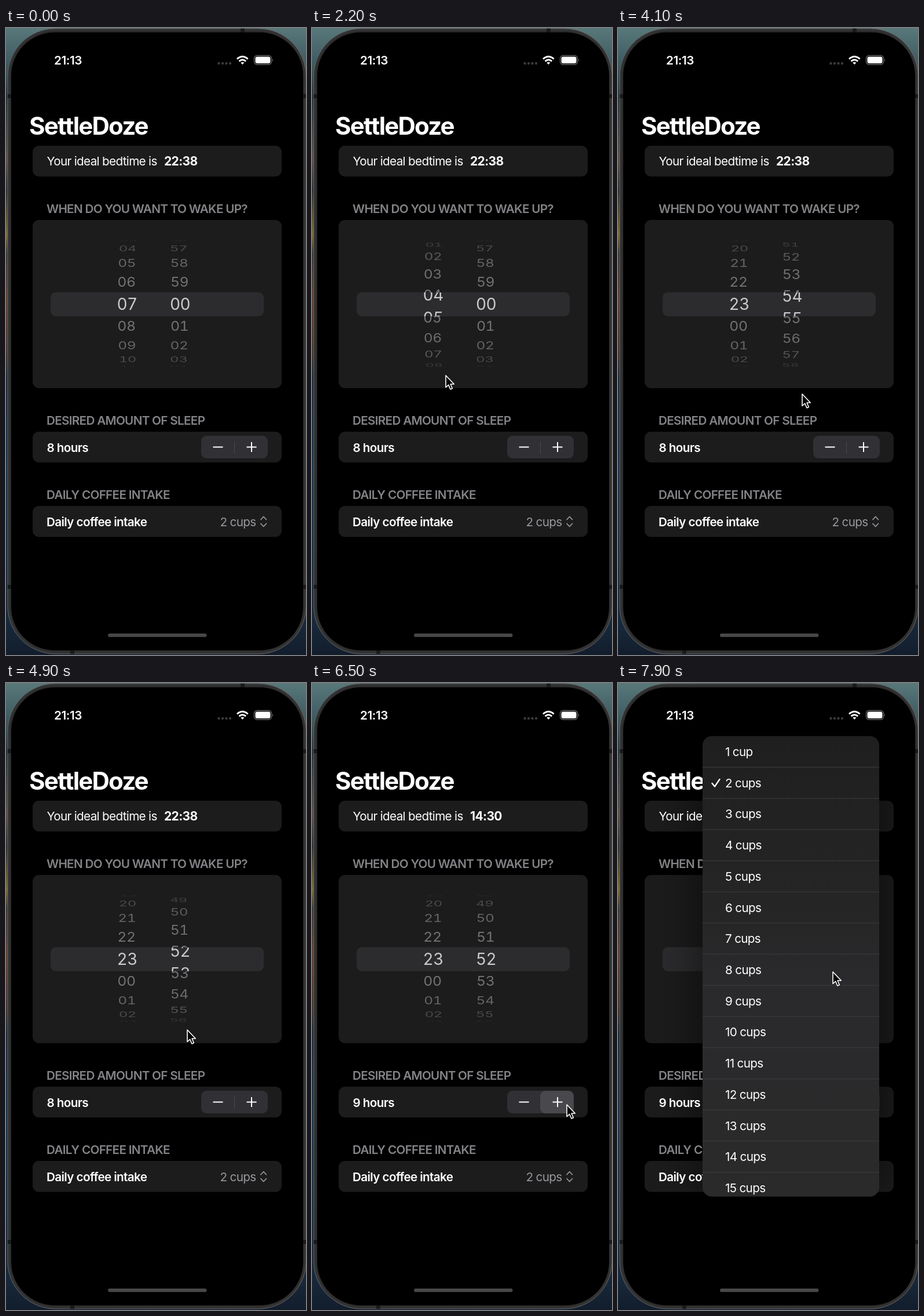
Animation of 518x1081 px, one loop 8 s. Source, as an HTML page:

```html
<!DOCTYPE html>
<html lang="en">
<head>
<meta charset="utf-8">
<title>Sleep planner</title>
<style>
  html, body { margin: 0; width: 100%; height: 100%; overflow: hidden; background: #000; }
  svg { display: block; width: 100vw; height: 100vh; }
  text { font: 400 20.7px Inter, "Open Sans", sans-serif; letter-spacing: -.033em; fill: #fff; white-space: pre; }
  .head { font-weight: 600; letter-spacing: -.034em; fill: #838387; }
  .bold { font-weight: 600; letter-spacing: -.03em; }
  .title { font-size: 42px; font-weight: 700; letter-spacing: -.043em; }
  .card { fill: #1c1c1d; }
  .row, .mid { letter-spacing: -.02em; font-variant-numeric: tabular-nums; }
  .row { font-size: 25px; }
  .mid { font-size: 28px; fill: #cacacc; }
</style>
</head>
<body>
<svg viewBox="0 0 518 1081" preserveAspectRatio="none">
  <defs>
    <linearGradient id="wall" x2="0" y2="1">
      <stop offset="0" stop-color="#58787a"/>
      <stop offset=".06" stop-color="#3d5960"/>
      <stop offset=".11" stop-color="#24343a"/>
      <stop offset=".21" stop-color="#5c5148"/>
      <stop offset=".26" stop-color="#2f302e"/>
      <stop offset=".33" stop-color="#7d6d3a"/>
      <stop offset=".36" stop-color="#3a3734"/>
      <stop offset=".43" stop-color="#5f4233"/>
      <stop offset=".52" stop-color="#48342a"/>
      <stop offset=".56" stop-color="#1b2b3e"/>
      <stop offset=".7" stop-color="#1b324b"/>
      <stop offset=".95" stop-color="#18293b"/>
      <stop offset="1" stop-color="#121d2c"/>
    </linearGradient>
    <linearGradient id="panel" x2="0" y2="1">
      <stop offset="0" stop-color="#1f1f1f"/>
      <stop offset=".4" stop-color="#262626"/>
      <stop offset=".52" stop-color="#2a2a2d"/>
      <stop offset="1" stop-color="#2a2a2a"/>
    </linearGradient>
    <filter id="soft" x="-50%" y="-50%" width="200%" height="200%"><feGaussianBlur stdDeviation="45"/></filter>
    <clipPath id="band"><rect x="77" y="456" width="368" height="41"/></clipPath>
    <clipPath id="drum"><path d="M77 366H445V456H77ZM77 497H445V584H77Z"/></clipPath>
    <clipPath id="menuClip"><rect x="146" y="91.5" width="305" height="794" rx="16"/></clipPath>
  </defs>

  <!-- phone body -->
  <rect width="518" height="1081" fill="url(#wall)"/>
  <rect x="3" y="1" width="515" height="1078" rx="82" fill="#2c2c2d" stroke="#69696a"/>
  <rect x="5.5" y="3.5" width="510" height="1073" rx="79.5" fill="none" stroke="#353536" stroke-width="2"/>
  <path d="M3 114h6v7H3zM512 114h6v7h-6zM3 960h6v7H3zM512 960h6v7h-6zM405 1h7v7h-7zM111 1073h7v6h-7z" fill="#1a1a1b"/>
  <rect x="9" y="7.5" width="504" height="1065.5" rx="75"/>

  <!-- cards -->
  <g class="card">
    <rect x="46" y="203" width="430" height="53" rx="11"/>
    <rect x="46" y="331" width="430" height="290" rx="11"/>
    <rect x="46" y="696" width="430" height="53" rx="11"/>
    <rect x="46" y="824" width="430" height="53.5" rx="11"/>
  </g>
  <rect x="77" y="455.5" width="368" height="41.5" rx="9" fill="#2c2c2e"/>
  <g id="outer" clip-path="url(#drum)"></g>
  <g id="inner" clip-path="url(#band)"></g>

  <!-- stepper -->
  <rect x="337" y="703" width="115" height="39" rx="9" fill="#303035"/>
  <path d="M394.5 713v21" stroke="#48484d"/>
  <rect id="press" x="394" y="703" width="58" height="39" rx="9" fill="#48484d"/>
  <path d="M357.500 722.500h17M415.500 722.500h17M424 714v17" stroke="#fff" stroke-width="2"/>
  <path d="M440 847.500l4.700-5 4.700 5M440 854.500l4.700 5 4.700-5" fill="none" stroke="#98989d" stroke-width="1.800" stroke-linecap="round" stroke-linejoin="round"/>
  <rect id="shade" x="146" y="91" width="305" height="794" filter="url(#soft)"/>

  <!-- status bar -->
  <text class="bold" x="83" y="63" style="letter-spacing:-.02em">21:13</text>
  <g fill="#3b3b3d">
    <circle cx="367.500" cy="61" r="2.200"/><circle cx="374" cy="61" r="2.200"/>
    <circle cx="380.500" cy="61" r="2.200"/><circle cx="387" cy="61" r="2.200"/>
  </g>
  <g fill="none" stroke="#fff" stroke-width="3">
    <path d="M399 53.500q9.300-8.400 18.600 0M402.500 57.300q5.800-5 11.600 0"/>
    <path d="M405.300 59.800q3-2.300 6 0l-3 3.200z" fill="#fff" stroke="none"/>
  </g>
  <rect x="428.500" y="47.500" width="30" height="15.500" rx="5" fill="none" stroke="#68686a" stroke-width="1.300"/>
  <rect x="430.500" y="49.500" width="26" height="11.500" rx="3.300" fill="#fff"/>
  <path d="M460 53q2.200 2.200 0 5z" fill="#68686a"/>

  <!-- labels -->
  <text class="title" x="40" y="184">SettleDoze</text>
  <text x="70.500" y="237">Your ideal bedtime is</text>
  <text id="bedtime" class="bold" x="273" y="237" style="font-weight:700;font-size:21px"></text>
  <text class="head" x="70" y="318.500">WHEN DO YOU WANT TO WAKE UP?</text>
  <text class="head" x="70" y="683.500">DESIRED AMOUNT OF SLEEP</text>
  <text id="sleep" class="bold" x="70.500" y="730.500"></text>
  <text class="head" x="70" y="811.500">DAILY COFFEE INTAKE</text>
  <text class="bold" x="70" y="858.500">Daily coffee intake</text>
  <text x="369.500" y="858.500" style="fill:#98989d">2 cups</text>
  <rect x="176" y="1044" width="170.500" height="6" rx="3" fill="#474748"/>

  <g id="menu"><g clip-path="url(#menuClip)">
    <rect x="146" y="91" width="305" height="795" fill="url(#panel)"/>
    <g id="items"></g>
    <path d="M162.500 173l4.500 5.500 8.500-12.500" fill="none" stroke="#fff" stroke-width="2.300" stroke-linecap="round" stroke-linejoin="round"/>
  </g></g>

  <path id="cursor" d="M0 0V20.500L4.700 16.300 8 24 11.300 22.500 8.100 15H14.300Z" fill="#000" stroke="#fff" stroke-width="1.600" stroke-linejoin="round"/>
</svg>
<script>
const LOOP = 8000, STEP = 100;
const $ = id => document.getElementById(id);
const linear = u => u;
const out = u => 1 - (1 - u) ** 3;
const smooth = u => u * u * (3 - 2 * u);

// Each entry: time, value(s), easing towards that entry.
const HOURS = [[1500, 7], [2200, 4.4], [2400, 3.7], [2900, 0, out], [3500, 0], [3800, -1, smooth]];
const MINUTES = [[3300, 0], [4100, -5.63, smooth], [4400, -6, out], [4500, -6], [4900, -7.65], [5200, -8, out]];
const CURSOR = [
  [600, [430, 1090]], [1000, [346, 704]], [1300, [222, 492], out], [1500, [222, 498]],
  [2200, [231, 599]], [2400, [234, 621], out], [3000, [295, 506], smooth],
  [3300, [303, 425], smooth], [4100, [318, 631], smooth], [4200, [318, 631]],
  [4500, [314, 535], smooth], [4900, [313, 598]], [5000, [313, 601]],
  [5600, [439, 745], smooth], [5900, [440, 727], smooth], [6700, [440, 727]],
  [7200, [410, 848], smooth], [7400, [410, 848]], [7900, [371, 498], smooth]
];
const MENU_SCALE = [[7400, .25], [7500, .75], [7600, 1], [7700, 1.018], [7800, 1.004], [7900, 1]];
const MENU_ALPHA = [[7300, 0], [7400, .4], [7500, .9], [7600, 1]];
const BEDTIME = [[0, "22:38"], [5500, "15:30"], [6100, "15:00"], [6500, "14:30"]];
const SLEEP = [[0, "8"], [6100, "8.5"], [6500, "9"]];
const PRESS = [[0, 0], [6100, 1], [6300, 0], [6500, 1], [6700, 0]];

function tween(track, t) {
  const next = track.findIndex(k => k[0] > t);
  if (next === 0) return track[0][1];
  if (next < 0) return track[track.length - 1][1];
  const [t0, a] = track[next - 1], [t1, b, ease = linear] = track[next];
  const u = ease((t - t0) / (t1 - t0));
  const mix = (p, q) => p + (q - p) * u;
  return Array.isArray(a) ? a.map((p, i) => mix(p, b[i])) : mix(a, b);
}

const hold = (track, t) => track.filter(k => k[0] <= t).pop()[1];

const PITCH = Math.PI / 9, RADIUS = 110.5, MID_X = 261, MID_Y = 475.7;

// Rows of a number wheel, wrapped on a drum seen from the front.
function wheelRows(value, count, x, size, cls, reach) {
  let rows = "";
  for (let n = Math.ceil(value - reach); n <= value + reach; n++) {
    const angle = (n - value) * PITCH, c = Math.cos(angle);
    const s = 1 - .08 * (1 - c);
    const label = String((n % count + count) % count).padStart(2, "0");
    const alpha = cls === "row" ? .38 * Math.min(1, 1.1 * c) : 1;
    rows += `<text class="${cls}" y="${.364 * size}" fill-opacity="${alpha}" transform="translate(${
      MID_X + (x - MID_X) * s} ${MID_Y + RADIUS * Math.sin(angle)}) scale(${s} ${c})">${label}</text>`;
  }
  return rows;
}

function render(t) {
  const hour = tween(HOURS, t), minute = tween(MINUTES, t);
  $("outer").innerHTML = wheelRows(hour, 24, 192, 25, "row", 4.4) + wheelRows(minute, 60, 284, 25, "row", 4.4);
  $("inner").innerHTML = wheelRows(hour, 24, 191.5, 28, "mid", 1.2) + wheelRows(minute, 60, 283, 28, "mid", 1.2);

  $("bedtime").textContent = hold(BEDTIME, t);
  $("sleep").textContent = hold(SLEEP, t) + " hours";
  $("press").setAttribute("opacity", hold(PRESS, t));

  const [x, y] = tween(CURSOR, t);
  $("cursor").setAttribute("transform", `translate(${x} ${y})`);

  const scale = tween(MENU_SCALE, t), alpha = tween(MENU_ALPHA, t);
  $("menu").setAttribute("transform", `translate(440 851) scale(${scale}) translate(-440 -851)`);
  $("menu").setAttribute("opacity", alpha);
  $("shade").setAttribute("opacity", alpha * .6);
}

const ITEM = 53.72;
$("items").innerHTML = Array.from({ length: 15 }, (_, i) => {
  const top = 91.5 + i * ITEM;
  const line = i ? `<path d="M146 ${top}h305" stroke="#3d3d3e"/>` : "";
  return `${line}<text x="185" y="${top + 34.5}">${i + 1} cup${i ? "s" : ""}</text>`;
}).join("");

let shown = -1;
function tick() {
  const t = Math.floor(performance.now() % LOOP / STEP) * STEP;
  if (t !== shown) render(shown = t);
  requestAnimationFrame(tick);
}
tick();
</script>
</body>
</html>
```
